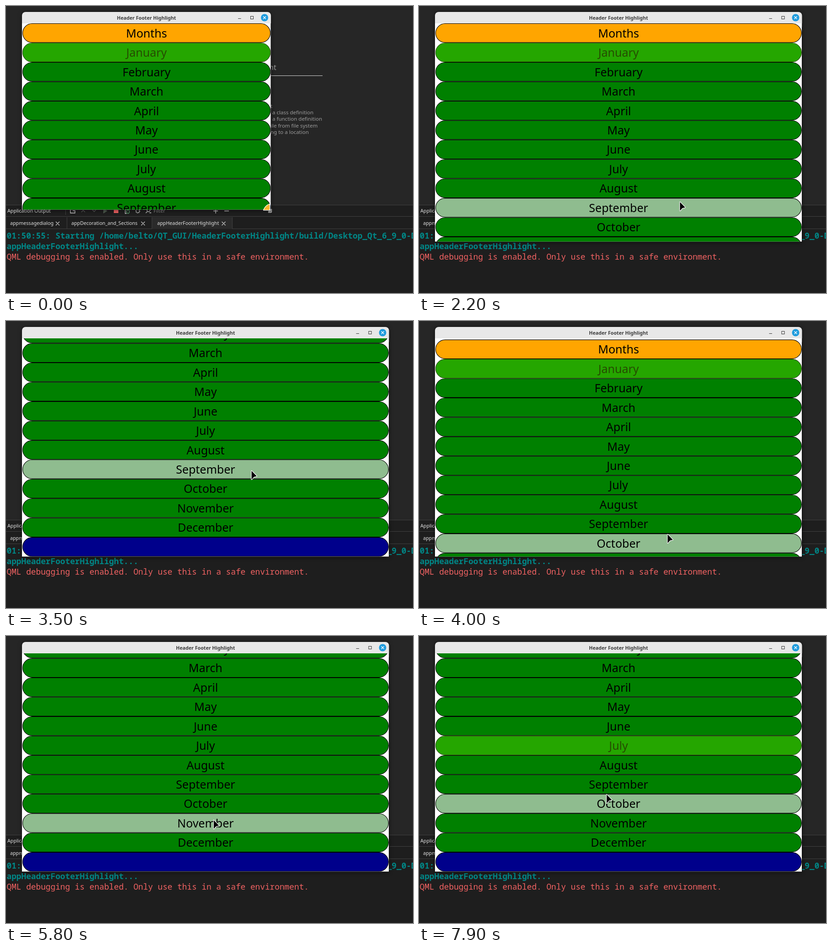
An HTML page that plays this animation: 891x628 px, repeating every 8 s.

```html
<!DOCTYPE html>
<html lang="en">
<head>
<meta charset="utf-8">
<title>Header Footer Highlight</title>
<style>
  html, body { margin: 0; width: 100%; height: 100%; overflow: hidden; background: #1e1e1e; }
  svg { display: block; font-family: "Noto Sans", "Open Sans", sans-serif; }
  .ui { font-size: 10.7px; fill: #e0e0e0; }
  .hint { font-size: 11.5px; fill: #9c9c9c; }
  .heading { font-size: 16px; }
  .log { font: 17.8px "Noto Sans Mono", "DejaVu Sans Mono", monospace; }
  .start { fill: #008787; font-weight: 700; }
  .warn { fill: #f06262; }
  .label { font-size: 25px; text-anchor: middle; }
  .title { font-size: 10.7px; font-weight: 700; fill: #3c3c3c; text-anchor: middle; }
  .shadow { filter: drop-shadow(0 1px 4px rgba(0, 0, 0, .6)); }
</style>
</head>
<body>
<svg width="891" height="628" viewBox="0 0 891 628">
  <defs><clipPath id="clip"><rect id="clipBox" x="35" y="38"/></clipPath></defs>

  <rect width="891" height="435" fill="#262626"/>
  <rect y="435" width="891" height="193" fill="#1e1e1e"/>
  <rect x="320" y="462" width="175" height="26" fill="#2a2a2a"/>
  <path d="M0 435.5H891M0 460.5H891M0 487.5H320M495 487.5H891M130.5 440V457M133.5 462V487M319.5 462V487M495.5 462V487" stroke="#404040" fill="none"/>

  <g class="hint">
    <text class="heading" x="576" y="140">nt</text>
    <text x="579" y="223">t</text>
    <text x="583" y="237">a class definition</text>
    <text x="583" y="251">a function definition</text>
    <text x="580" y="266">ile from file system</text>
    <text x="579" y="280">ng to a location</text>
  </g>
  <path d="M400 152.5H693" stroke="#d4d4d4"/>

  <g class="ui">
    <text x="3" y="452">Application Output</text>
    <text x="323" y="452" fill="#8c8c8c">Filter</text>
    <text x="9" y="479">appmessagedialog</text>
    <text x="143" y="479">appDecoration_and_Sections</text>
    <text x="331" y="479">appHeaderFooterHighlight</text>
  </g>
  <g fill="none" stroke="#c8c8c8" stroke-width="1.3">
    <path d="M141 444V453H151V448H146M454 448.5H464M459 443V454M478 448.5H488"/>
    <path d="M165 451l4-4 4 4M189 446l4 4 4-4" stroke="#5a5a5a"/>
    <path d="M213 443L222 448.5 213 454Z" fill="#4d5a4d" stroke="none"/>
    <rect x="236" y="443" width="10" height="10" fill="#f06262" stroke="none"/>
    <path d="M261 444V454H264"/>
    <ellipse cx="267" cy="450" rx="3" ry="4" stroke="#5cae74"/>
    <circle cx="288.5" cy="448.5" r="4" stroke-width="2" stroke-dasharray="2 1"/>
    <circle cx="312" cy="446.5" r="3.5"/>
    <path d="M309.5 449.5L306 453M314 452.5h4"/>
    <path d="M109 472l8 8m0-8l-8 8M296 472l8 8m0-8l-8 8M472.500 472l8 8m0-8l-8 8"/>
  </g>

  <g class="log">
    <text class="start" x="1.500" y="509.400">01:50:55: Starting /home/belto/QT_GUI/HeaderFooterHighlight/build/Desktop_Qt_6_9_0-Debug/</text>
    <text class="start" x="1.500" y="532.400">appHeaderFooterHighlight...</text>
    <text class="warn" x="1.500" y="555.400">QML debugging is enabled. Only use this in a safe environment.</text>
  </g>

  <g class="shadow">
    <rect id="frame" x="35" y="13" rx="8" height="40" fill="#e8e8e8"/>
    <rect id="edge" x="35" y="38" fill="#111"/>
  </g>
  <path id="trails" fill="none" stroke="#fff" stroke-width="1.2"/>
  <rect id="page" x="35" y="38" fill="#fff"/>
  <text id="title" class="title" y="29.5">Header Footer Highlight</text>
  <g id="buttons" fill="none" stroke="#333">
    <path d="M-72 27.5H-65.5"/>
    <rect x="-44.5" y="22.5" width="6" height="6"/>
    <circle cx="-14" cy="25.5" r="8" fill="#1e9bdd" stroke="none"/>
    <path d="M-17 22.5l6 6m0-6l-6 6" stroke="#fff" stroke-width="1.3"/>
  </g>

  <g clip-path="url(#clip)">
    <g id="rows"></g>
    <rect id="mark" x="36" height="42.4" rx="21.2" fill="#7cfc00" opacity=".3"/>
  </g>

  <path id="arrow" d="M.7 1.2V19.5Q1 21 2.3 20L6.8 14.8 12.2 13.6Q13.6 13 12.6 11.9L2 .8Q.9 0 .7 1.2Z" stroke="#fff" stroke-width="1.2" stroke-linejoin="round"/>
  <g id="grip" fill="none" stroke="#fff" stroke-linejoin="round">
    <path d="M-6 4.5H0V-2" stroke-width="3.5"/>
    <path d="M-6 4.5H0V-2" stroke="#222" stroke-width="1.5"/>
    <path d="M-16.5 .8C-14-6-9-11-2.5-13V.8Z" fill="#f8b62d" stroke-width="1.3"/>
  </g>
</svg>

<script>
const LOOP = 8000, STEP = 100;
const TOP = 38, LEFT = 36, PITCH = 42.45;
const NAMES = ['Months', 'January', 'February', 'March', 'April', 'May', 'June', 'July',
  'August', 'September', 'October', 'November', 'December', ''];

const RESIZE = { from: 300, to: 1660 };
const LAYOUT_LAG = 125;
const ARROW_FROM = 1800;
const MAX_SCROLL = 116.8;

// Each drag flings the list to its other end.
const DRAGS = [2600, 3600, 4500], DRAG_TIME = 500;
const CLICK = 6700, CLICKED_ROW = 7, MARK_SPEED = .4;

// Pointer stops: arrival time, x, y. A hop takes at most HOP ms.
const HOP = 400;
const STOPS = [
  [1700, 838, 516], [2200, 570, 428], [2400, 540, 398], [3000, 527, 218], [3600, 538, 347],
  [4000, 543, 466], [4500, 538, 507], [4900, 525, 335], [5300, 490, 497], [5750, 453.5, 402],
  [6450, 450, 235], [7500, 425, 150], [7900, 409.5, 346]
];

const el = id => document.getElementById(id);
const set = (node, attrs) => { for (const k in attrs) node.setAttribute(k, attrs[k]); };
const clamp = (v, min, max) => Math.min(max, Math.max(min, v));
const mix = (a, b, p) => a + (b - a) * p;
const smooth = p => p * p * (3 - 2 * p);
const overshoot = p => 1 + 1.95 * (p - 1) ** 3 + .95 * (p - 1) ** 2;

function windowSize(t) {
  const p = clamp((t - RESIZE.from) / (RESIZE.to - RESIZE.from), 0, 1);
  return { right: mix(580, 838.5, p), bottom: mix(446, 516, p) + 156 * p * (1 - p) };
}

function pointerAt(t) {
  let [, x, y] = STOPS[0];
  STOPS.slice(1).forEach(([arrive, nextX, nextY], i) => {
    const time = Math.min(HOP, arrive - STOPS[i][0]);
    const p = smooth(clamp((t - arrive + time) / time, 0, 1));
    x = mix(x, nextX, p);
    y = mix(y, nextY, p);
  });
  return { x, y };
}

function scrollAt(t) {
  return DRAGS.reduce((pos, from, i) => {
    const p = clamp((t - from) / DRAG_TIME, 0, 1);
    return p ? mix(pos, i % 2 ? 0 : MAX_SCROLL, overshoot(p)) : pos;
  }, 0);
}

// A pressed row keeps its hover colour while it is dragged.
function hoveredRow(t) {
  if (t < ARROW_FROM) return -1;
  const drag = DRAGS.find(from => t >= from && t <= from + DRAG_TIME);
  const when = drag || t;
  return Math.floor((pointerAt(when).y - TOP + scrollAt(when)) / PITCH);
}

function rowColor(i, hover) {
  if (i === 0) return '#ffa500';
  if (i === NAMES.length - 1) return '#00008b';
  return i === hover ? '#8fbc8f' : '#008000';
}

function make(tag, attrs) {
  const node = document.createElementNS('http://www.w3.org/2000/svg', tag);
  set(node, attrs);
  return el('rows').appendChild(node);
}

const rows = NAMES.map(name => {
  const box = make('rect', { x: LEFT + .5, height: PITCH - 1.1, rx: 20.6, stroke: '#000', 'stroke-width': 1.1 });
  const label = make('text', { class: 'label' });
  label.textContent = name;
  return { box, label };
});

function drawWindow({ right, bottom }, growing) {
  const gapX = growing ? 8 : .5, gapY = growing ? 5 : .5;
  set(el('frame'), { width: right - 35 });
  set(el('edge'), { width: right - 35, height: bottom - TOP });
  for (const id of ['page', 'clipBox']) {
    set(el(id), { width: right - gapX - 35, height: bottom - gapY - TOP });
  }
  set(el('trails'), {
    d: growing ? [1.5, 4].map(d => `M35 ${bottom - d}H${right - d * 1.3}V${TOP}`).join('') : ''
  });
  set(el('title'), { x: (35 + right) / 2 });
  set(el('buttons'), { transform: `translate(${right})` });
}

function drawList(t, edge, growing) {
  const hover = hoveredRow(t);
  const start = TOP - scrollAt(t) + (growing ? 5 : 0);
  rows.forEach(({ box, label }, i) => {
    const top = start + i * PITCH;
    set(box, { y: top + .55, width: edge - LEFT - 1, fill: rowColor(i, hover) });
    set(label, { x: (LEFT + edge) / 2, y: top + 30.7 });
  });
  const marked = clamp(1 + (t - CLICK) * MARK_SPEED / PITCH, 1, CLICKED_ROW);
  set(el('mark'), { y: start + marked * PITCH, width: edge - LEFT - (growing ? 4 : 0) });
}

function drawPointer(t, { right, bottom }, growing) {
  const arrow = t >= ARROW_FROM;
  const { x, y } = pointerAt(t);
  const [dx, dy] = growing ? [8, 2.5] : [0, 0];
  set(el('arrow'), { visibility: arrow ? 'visible' : 'hidden', transform: `translate(${x} ${y})` });
  set(el('grip'), {
    visibility: arrow ? 'hidden' : 'visible',
    transform: `translate(${right + dx} ${bottom + dy})`
  });
}

function draw(t) {
  const size = windowSize(t);
  const layoutRight = windowSize(t - LAYOUT_LAG).right;
  const growing = size.right > layoutRight;
  drawWindow(size, growing);
  drawList(t, layoutRight - .8, growing);
  drawPointer(t, size, growing);
}

function tick() {
  const t = performance.now() % LOOP;
  draw(Math.floor(t / STEP) * STEP);
  requestAnimationFrame(tick);
}
tick();
</script>
</body>
</html>
```
